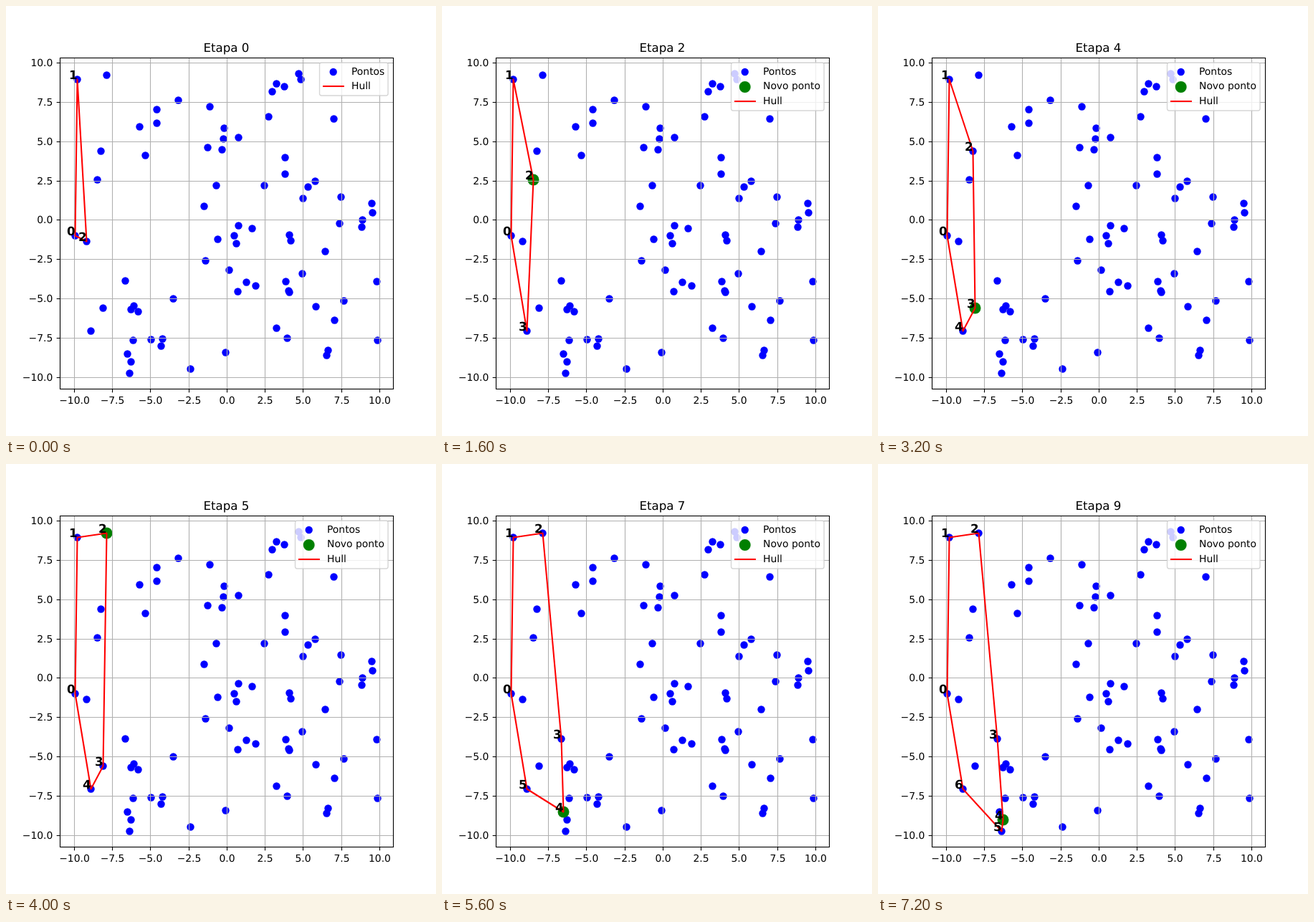
An HTML page for the animation above (8000 ms loop, 600 by 600 pixels).

```html
<!DOCTYPE html>
<html lang="pt">
<head>
<meta charset="utf-8">
<title>Etapas</title>
<style>
html, body { margin: 0; width: 100%; height: 100%; overflow: hidden; background: #fff; }
svg { display: block; width: 600px; height: 600px; }
text { font: 13.889px "DejaVu Sans", sans-serif; text-rendering: geometricPrecision; }
.title { font-size: 16.667px; }
.label { font-size: 16.667px; font-weight: bold; }
.mid { text-anchor: middle; }
.end { text-anchor: end; }
.grid { stroke: #b0b0b0; stroke-width: 1.11; }
.axis { stroke: #000; stroke-width: 1.11; fill: none; }
.hull { stroke: red; stroke-width: 2.083; fill: none; stroke-linejoin: round; stroke-linecap: square; }
.box { fill: #fff; stroke: #ccc; stroke-width: 1.389; fill-opacity: .8; stroke-opacity: .8; }
</style>
</head>
<body>
<svg viewBox="0 0 600 600">
  <g id="dots"></g>
  <g id="fresh"></g>
  <g id="axes"></g>
  <g id="hull"></g>
  <g id="legend"></g>
</svg>
<script>
const STEP = 800, STAGES = 10;
const LEFT = 75.5, RIGHT = 540.5, TOP = 72.5, BOTTOM = 534.5;

// Points the sweep reaches, from left to right.
const swept = [
  [96, 320], [99, 102], [112, 328], [118, 453], [127, 242], [132, 202],
  [135, 421], [140, 96], [166, 383], [169, 485], [172, 512], [174, 496]
];
// Points that stay outside the hull.
const others = [
  [174, 423], [178, 418], [184, 426], [177, 466], [202, 465], [218, 464], [216, 474],
  [233, 408], [257, 506], [278, 355], [306, 483], [311, 368], [323, 398], [335, 385],
  [348, 390], [377, 449], [392, 463], [390, 384], [394, 397], [395, 399], [413, 373],
  [432, 419], [471, 411], [458, 438], [449, 480], [447, 487], [517, 384], [518, 466],
  [445, 342], [395, 319], [397, 327], [343, 310], [324, 306], [318, 320], [321, 331],
  [295, 325], [276, 279], [293, 250], [360, 250], [414, 268], [421, 252], [431, 244],
  [467, 266], [465, 303], [510, 275], [511, 288], [497, 298], [496, 308], [389, 234],
  [389, 211], [366, 154], [371, 119], [377, 108], [388, 112], [408, 94], [411, 102],
  [457, 157], [304, 170], [303, 185], [301, 200], [281, 197], [324, 183], [284, 140],
  [240, 131], [210, 144], [210, 163], [186, 168], [194, 208]
];

const layer = id => document.getElementById(id);
const circle = (x, y, r, fill) => `<circle cx="${x}" cy="${y}" r="${r}" fill="${fill}"/>`;
const line = (x1, y1, x2, y2, cls) =>
  `<line x1="${x1}" y1="${y1}" x2="${x2}" y2="${y2}" class="${cls}"/>`;
const text = (x, y, str, cls = "") => `<text x="${x}" y="${y}" class="${cls}">${str}</text>`;
const blueDot = (x, y) => circle(x, y, 5.2, "blue");
const greenDot = (x, y) => circle(x, y, 7.98, "green");

function drawAxes() {
  let grid = "", ticks = "";
  for (let v = -10; v <= 10; v += 2.5) {
    const x = Math.floor(308.3 + 21.3 * v) + .5;
    const y = Math.floor(298.9 - 21.95 * v) + .5;
    const name = v.toFixed(1).replace("-", "\u2212");
    grid += line(x, TOP, x, BOTTOM, "grid") + line(LEFT, y, RIGHT, y, "grid");
    ticks += line(x, BOTTOM, x, BOTTOM + 4.86, "axis") + line(LEFT - 4.86, y, LEFT, y, "axis")
      + text(x, 555, name, "mid") + text(65.3, y + 4.5, name, "end");
  }
  const frame = `<rect x="${LEFT}" y="${TOP}" width="${RIGHT - LEFT}" height="${BOTTOM - TOP}" class="axis"/>`;
  layer("axes").innerHTML = grid + ticks;
  return frame;
}

// Convex hull, clockwise from the leftmost point.
function convexHull(pts) {
  const turn = (o, a, b) => (a[0] - o[0]) * (b[1] - o[1]) - (a[1] - o[1]) * (b[0] - o[0]);
  const chain = list => {
    const out = [];
    for (const p of list) {
      while (out.length > 1 && turn(out.at(-2), out.at(-1), p) <= 0) out.pop();
      out.push(p);
    }
    return out.slice(0, -1);
  };
  return [...chain(pts), ...chain([...pts].reverse())];
}

function legend(withNew) {
  const x = withNew ? 403.5 : 437.5;
  const mark = x + 19.2, label = x + 44.5;
  let y = withNew ? 133 : 112;
  let out = `<rect x="${x}" y="78.94" width="${533.06 - x}" height="${withNew ? 67 : 46}" rx="2.78" class="box"/>`
    + blueDot(mark, 92) + text(label, 96, "Pontos");
  if (withNew) out += greenDot(mark, 113) + text(label, 116, "Novo ponto");
  return out + line(x + 5.56, y, x + 33.34, y, "hull") + text(label, y + 4, "Hull");
}

const frame = drawAxes();
layer("dots").innerHTML = [...swept, ...others].map(([x, y]) => blueDot(x + .5, y + .5)).join("");

let shown = -1;
function draw(time) {
  const stage = Math.floor(time / STEP) % STAGES;
  if (stage === shown) return;
  shown = stage;
  const pts = swept.slice(0, stage + 3);
  const hull = convexHull(pts);
  const [nx, ny] = pts.at(-1);
  const path = hull.map(([x, y]) => `${x + .5} ${y + .5}`).join("L");
  layer("fresh").innerHTML = stage ? greenDot(nx + .5, ny + .5) : "";
  layer("hull").innerHTML = `<path d="M${path}Z" class="hull"/>` + frame
    + hull.map(([x, y], i) => text(x + .5, y, i, "label end")).join("")
    + text(307.5, 64, "Etapa " + stage, "title mid");
  layer("legend").innerHTML = legend(stage > 0);
}

const start = performance.now();
function tick() {
  draw(performance.now() - start);
  requestAnimationFrame(tick);
}
tick();
</script>
</body>
</html>
```
